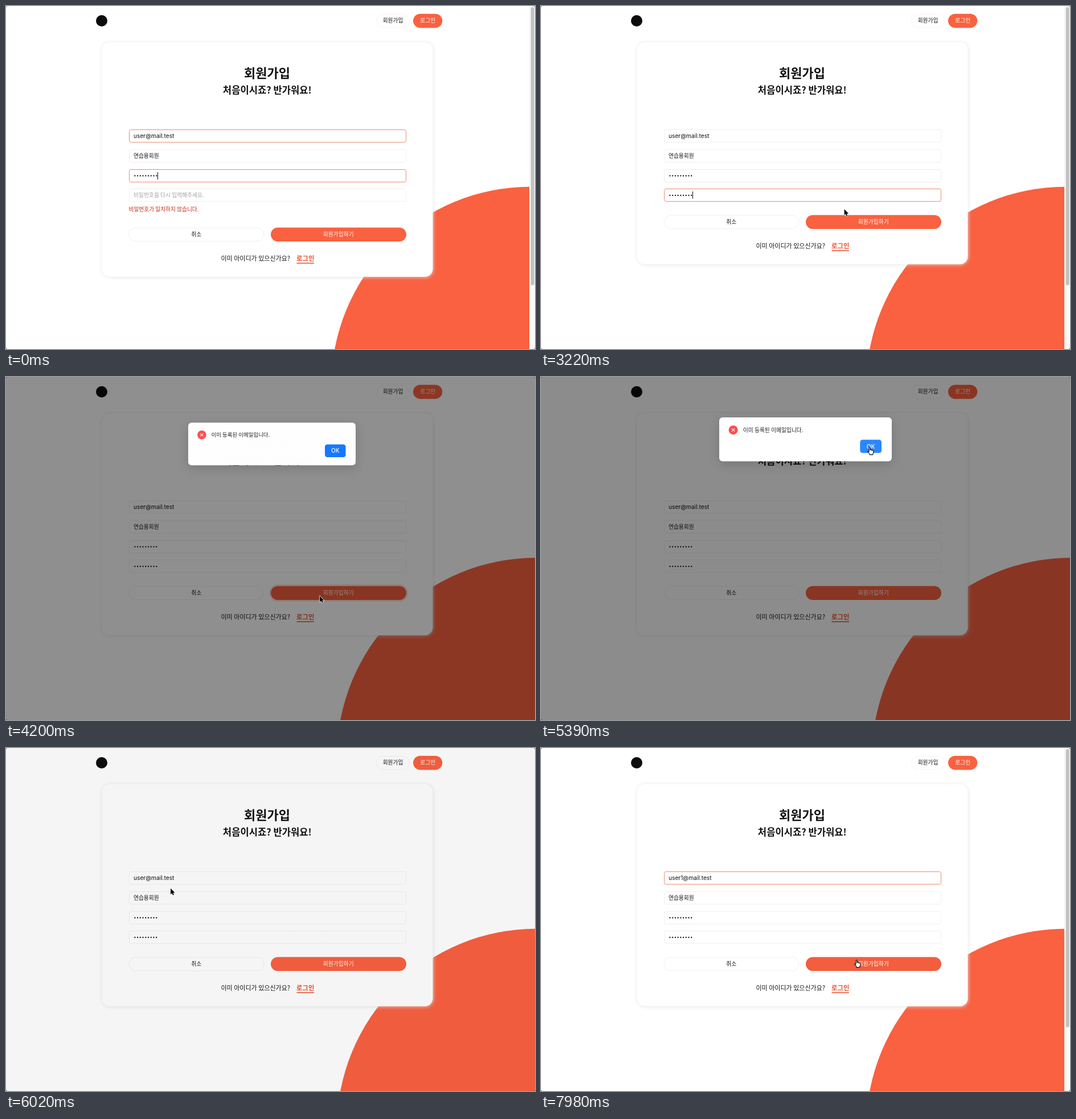
An HTML page with a canvas that plays this animation: 929x603 px, repeating every 8 s.

```html
<!DOCTYPE html>
<html lang="ko">
<head>
<meta charset="utf-8">
<title>회원가입</title>
<style>
  html, body { margin: 0; width: 100%; height: 100%; overflow: hidden; background: #fff; }
  canvas { display: block; width: 929px; height: 603px; }
</style>
</head>
<body>
<canvas id="stage"></canvas>
<script>
const W = 929, H = 603, LOOP = 8000;
const canvas = document.getElementById('stage');
const ctx = canvas.getContext('2d');
const dpr = window.devicePixelRatio || 1;
canvas.width = W * dpr;
canvas.height = H * dpr;

const ORANGE = [249, 97, 64], ORANGE_DARK = [216, 83, 54];
const LINE = [240, 240, 240], ACCENT = [236, 140, 113];
const BLUE = [22, 119, 255], BLUE_HOVER = [64, 150, 255];
const KR = '"Noto Sans CJK KR", "Noto Sans CJK", sans-serif';
const LATIN = 'Inter, "Noto Sans CJK KR", sans-serif';

// Boxes are [x, y, width, height]
const FIELDS = [0, 1, 2, 3].map(i => [216, Math.round(217.2 + i * 34.7), 487, 23]);
const OK = [560.3, 110.3, 37.7, 23.2];
const ORIGIN = [550, 385];

// Moments of the scene, in ms
const TAB = 350, MATCH = 1820, PRESS = 3710, COVER = 4050, FREE = 6045, REFOCUS = 6230, EDIT = 7070;
const KEYS = [700, 770, 840, 980, 1050, 1190, 1330, 1470, MATCH];
const PATH = [
  [2590, 470, 222], [2800, 480, 250], [3220, 532.5, 357], [3360, 551, 385],
  [4550, 551, 385], [5320, 577, 124], [5800, 577, 124], [5880, 509.5, 158.5],
  [6020, 289.5, 247], [6130, 243, 229], [7210, 243, 229], [7770, 490, 346], [7980, 554, 373]
];

const clamp = v => Math.max(0, Math.min(1, v));
const ramp = (t, start, length) => clamp((t - start) / length);
const rgb = c => `rgb(${c})`;
const mix = (a, b, k) => rgb(a.map((v, i) => Math.round(v + (b[i] - v) * k)));
const inside = ([x, y, w, h], [px, py]) => px >= x && px <= x + w && py >= y && py <= y + h;

function bezier(x1, y1, x2, y2) {
  const curve = (u, a, b) => 3 * (1 - u) * (1 - u) * u * a + 3 * (1 - u) * u * u * b + u * u * u;
  return x => {
    if (x <= 0 || x >= 1) return clamp(x);
    let lo = 0, hi = 1;
    for (let i = 0; i < 24; i++) {
      const mid = (lo + hi) / 2;
      if (curve(mid, x1, x2) < x) lo = mid; else hi = mid;
    }
    return curve(lo, y1, y2);
  };
}
const outCirc = bezier(.08, .82, .17, 1);
const inOutCirc = bezier(.78, .14, .15, .86);

function pointer(t) {
  if (t <= PATH[0][0]) return PATH[0].slice(1);
  for (let i = 1; i < PATH.length; i++) {
    const [t0, x0, y0] = PATH[i - 1], [t1, x1, y1] = PATH[i];
    if (t < t1) {
      const k = (t - t0) / (t1 - t0);
      return [x0 + (x1 - x0) * k, y0 + (y1 - y0) * k];
    }
  }
  return PATH[PATH.length - 1].slice(1);
}

const covered = t => t > COVER && t < FREE;
const focus = t => t < TAB ? 2 : t < PRESS ? 3 : t < REFOCUS ? -1 : 0;
const drop = t => t < MATCH ? 22 : 0;
const submitBox = t => [465, 367.5 + drop(t), 238, 24.5];

// A linear 200 ms transition of an on/off state
function eased(state, t) {
  let sum = 0;
  for (let i = 0; i < 20; i++) sum += state(t - (i + .5) * 10) ? 1 : 0;
  return sum / 20;
}

function shape([x, y, w, h], r) {
  ctx.beginPath();
  ctx.roundRect(x, y, w, h, r);
}
function fillBox(box, r, color) {
  shape(box, r);
  ctx.fillStyle = color;
  ctx.fill();
}
function strokeBox([x, y, w, h], r, color) {
  shape([x + .5, y + .5, w - 1, h - 1], r);
  ctx.strokeStyle = color;
  ctx.lineWidth = 1;
  ctx.stroke();
}
function shadow(color, blur = 0, dx = 0, dy = 0) {
  ctx.shadowColor = color;
  ctx.shadowBlur = blur * dpr;
  ctx.shadowOffsetX = dx * dpr;
  ctx.shadowOffsetY = dy * dpr;
}
const noShadow = () => shadow('transparent');

function text(str, x, y, size, { color = '#111', weight = 400, align = 'left', font = KR } = {}) {
  ctx.font = `${weight} ${size}px ${font}`;
  ctx.textAlign = align;
  ctx.fillStyle = color;
  ctx.fillText(str, x, y + size * .36);
}
function disc(x, y, r, color) {
  ctx.beginPath();
  ctx.arc(x, y, r, 0, Math.PI * 2);
  ctx.fillStyle = color;
  ctx.fill();
}

// Click ripple around a button
function wave([x, y, w, h], r, age, color) {
  if (age <= 0 || age >= 900) return;
  const spread = 3 * outCirc(clamp(age / 400));
  ctx.beginPath();
  ctx.roundRect(x - spread, y - spread, w + 2 * spread, h + 2 * spread, r + spread);
  ctx.roundRect(x, y, w, h, r);
  ctx.fillStyle = `rgba(${color},${.34 * (1 - age / 900)})`;
  ctx.fill('evenodd');
}

function header() {
  disc(168, 26, 10, '#0c0c0c');
  strokeBox([650, 14, 59, 24.5], 12, '#f4f4f4');
  text('회원가입', 679.5, 26, 9.7, { align: 'center' });
  fillBox([715, 13.7, 51.3, 24.8], 12.4, rgb(ORANGE));
  text('로그인', 740.7, 26, 9.7, { align: 'center', color: '#fff', weight: 500 });
}

function bullets(n, y) {
  for (let i = 0; i < n; i++) disc(226.4 + i * 4.73, y, 1.15, '#111');
}
function caret(x, y, since, t) {
  if (Math.floor((t - since) / 500) % 2 === 0) {
    ctx.fillStyle = '#111';
    ctx.fillRect(Math.round(x), Math.round(y - 6.5), 1, 13);
  }
}

function fields(t) {
  const active = focus(t);
  const typed = KEYS.filter(k => t >= k);
  FIELDS.forEach((box, i) => {
    const lit = eased(s => focus(s) === i || (!covered(s) && inside(box, pointer(s))), t);
    strokeBox(box, 3, mix(LINE, ACCENT, lit));
  });
  const rows = FIELDS.map(b => b[1] + b[3] / 2);
  text(t < EDIT ? 'user@mail.test' : 'user1@mail.test', 224, rows[0], 10.2, { font: LATIN });
  text('연습용회원', 224, rows[1], 9.7);
  bullets(9, rows[2]);
  if (typed.length) bullets(typed.length, rows[3] + .5);
  else text('비밀번호를 다시 입력해주세요.', 224, rows[3], 9.75, { color: '#a3a3a3' });

  if (active === 2) caret(266, rows[2], 0, t);
  if (active === 3) caret(223.5 + typed.length * 4.73, rows[3], typed.length ? typed[typed.length - 1] : TAB, t);
  if (active === 0) {
    ctx.font = `400 10.2px ${LATIN}`;
    const before = t < EDIT ? 'user' : 'user1';
    caret(224 + ctx.measureText(before).width, rows[0], t < EDIT ? REFOCUS : EDIT, t);
  }
}

function card(t) {
  const dy = drop(t);
  shadow('rgba(226,226,226,.95)', 6, .5, .5);
  fillBox([168.5, 63.5, 581, 390.5 + dy], 14, '#fff');
  noShadow();

  text('회원가입', 458.5, 118, 22, { weight: 700, align: 'center' });
  text('처음이시죠? 반가워요!', 458.8, 148, 16.6, { weight: 700, align: 'center' });
  fields(t);
  if (dy) text('비밀번호가 일치하지 않습니다.', 215.5, 357.5, 9.7, { color: '#c5280f', weight: 500 });

  const mid = 379.7 + dy;
  strokeBox([215.5, 367.5 + dy, 238, 24.5], 12.2, '#f0f0f0');
  text('취소', 334.3, mid, 9.8, { align: 'center' });

  const box = submitBox(t);
  wave(box, 12.2, t - PRESS - 70, ORANGE);
  const hot = eased(s => !covered(s) && inside(submitBox(s), pointer(s)), t);
  fillBox(box, 12.2, mix(ORANGE, ORANGE_DARK, hot));
  text('회원가입하기', 583.7, mid, 9.75, { align: 'center', color: '#fff', weight: 500 });

  text('이미 아이디가 있으신가요?', 377.5, 422.3 + dy, 11, { weight: 500 });
  text('로그인', 510, 421.8 + dy, 11.4, { weight: 700, color: '#e9502f' });
  ctx.fillStyle = '#e9502f';
  ctx.fillRect(510.5, 429.4 + dy, 30.5, 1.5);
}

function scrollbar() {
  ctx.fillStyle = '#fafafa';
  ctx.fillRect(919, 0, 10, H);
  ctx.fillStyle = '#ececec';
  ctx.fillRect(919, 0, .7, H);
  fillBox([921.7, 2, 6, 489], 3, '#c1c1c1');
}

function modal(t) {
  const shown = t < 5000 ? outCirc(ramp(t, 4044, 300)) : 1 - inOutCirc(ramp(t, 5829, 200));
  if (shown <= 0) return;
  const scale = .2 + .8 * shown;
  ctx.save();
  ctx.globalAlpha = 1 - (1 - shown) ** 1.5;
  ctx.translate(...ORIGIN);
  ctx.scale(scale, scale);
  ctx.translate(-ORIGIN[0], -ORIGIN[1]);
  shadow('rgba(0,0,0,.16)', 18, 0, 5);
  fillBox([313, 71, 303, 77.3], 6, '#fff');
  noShadow();

  disc(337.6, 93.2, 8, '#ff4d4f');
  ctx.strokeStyle = '#fff';
  ctx.lineWidth = 1.2;
  ctx.beginPath();
  for (const k of [-1, 1]) {
    ctx.moveTo(337.6 - 2.5, 93.2 - 2.5 * k);
    ctx.lineTo(337.6 + 2.5, 93.2 + 2.5 * k);
  }
  ctx.stroke();
  text('이미 등록된 이메일입니다.', 354.8, 93.2, 9.75, { color: '#1f1f1f' });

  wave(OK, 4.4, t - 5740, BLUE);
  const hot = eased(s => s > COVER && s < 5880 && inside(OK, pointer(s)), t);
  fillBox(OK, 4.4, mix(BLUE, BLUE_HOVER, hot));
  text('OK', OK[0] + OK[2] / 2, OK[1] + OK[3] / 2, 10.2, { align: 'center', color: '#fff', weight: 500, font: LATIN });
  ctx.restore();
}

const ARROW = new Path2D('M0 0V10.6L2.4 8.4L4 12L5.8 11.2L4.3 7.7H7.6Z');
const HAND = new Path2D('M-1 .5Q0-.8 1 .5V4.6Q2-.1 3 4.8Q4.2 4 5 5.2Q6.6 4.4 6.8 6.2V8.6' +
  'Q6.8 10 5.8 11V12.6H.2V11.4L-3.2 7.4Q-3.4 5.8-2 6.4L-1 7.4Z');
const BEAM = new Path2D('M-2-6Q0-6 0-5V5Q0 6-2 6M2-6Q0-6 0-5M0 5Q0 6 2 6');

function cursor(t) {
  if (t < PATH[0][0] || (t >= EDIT && t < 7210)) return;
  const at = pointer(t);
  const under = covered(t);
  const onButton = under ? t < 5830 && inside(OK, at) : inside(submitBox(t), at);
  const onField = !under && FIELDS.some(f => inside(f, at));
  ctx.save();
  ctx.translate(...at);
  ctx.lineJoin = 'round';
  if (onField) {
    ctx.strokeStyle = '#222';
    ctx.lineWidth = 1;
    ctx.stroke(BEAM);
  } else {
    const path = onButton ? HAND : ARROW;
    ctx.strokeStyle = onButton ? '#111' : '#fff';
    ctx.fillStyle = onButton ? '#fff' : '#000';
    ctx.lineWidth = onButton ? 1.1 : 1.4;
    if (onButton) ctx.fill(path);
    ctx.stroke(path);
    if (!onButton) ctx.fill(path);
  }
  ctx.restore();
}

function corners() {
  ctx.fillStyle = 'rgba(60,60,60,.7)';
  for (const [x, sx] of [[0, 1], [W, -1]]) {
    for (const [y, sy] of [[0, 1], [H, -1]]) {
      ctx.beginPath();
      ctx.moveTo(x, y);
      ctx.lineTo(x + 2 * sx, y);
      ctx.lineTo(x, y + 2 * sy);
      ctx.fill();
    }
  }
}

function draw(t) {
  const locked = t > 4005 && t < FREE;
  ctx.setTransform(dpr, 0, 0, dpr, 0, 0);
  ctx.fillStyle = '#fff';
  ctx.fillRect(0, 0, W, H);
  disc(locked ? 931.2 : 921.2, 667.8, 350, rgb(ORANGE));
  header();
  card(t);
  if (!locked) scrollbar();

  const shade = .45 * (ramp(t, 4009, 196) - ramp(t, 5830, 210));
  if (shade > 0) {
    ctx.fillStyle = `rgba(0,0,0,${shade})`;
    ctx.fillRect(0, 0, W, H);
  }
  modal(t);
  corners();
  cursor(t);
}

const start = performance.now();
function tick() {
  draw((performance.now() - start) % LOOP);
  requestAnimationFrame(tick);
}
tick();
</script>
</body>
</html>
```
